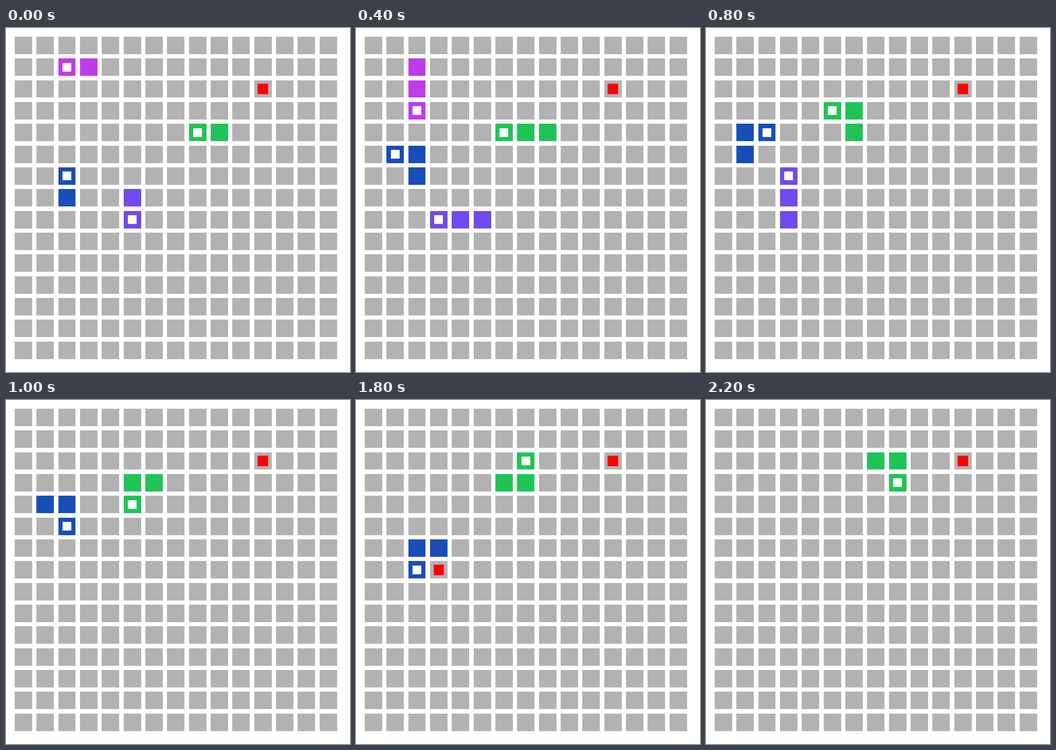
Recreate the animation shown at these times as an HTML page with a canvas. Size 748 px wide and 748 px high, loop 2.4 s.

```html
<!DOCTYPE html>
<html>
<head>
<meta charset="utf-8">
<style>
html, body { margin: 0; width: 100%; height: 100%; overflow: hidden; background: #fff; }
canvas { display: block; }
</style>
</head>
<body>
<canvas id="stage" width="748" height="748"></canvas>
<script>
const ctx = document.getElementById('stage').getContext('2d');
const SIZE = 748, CELLS = 15, PITCH = SIZE / (CELLS + 0.8);
const STEP = 200, STEPS = 12, LENGTH = 3;
const DIRS = { L: [-1, 0], R: [1, 0], U: [0, -1], D: [0, 1] };

// A snake lives for as many steps as it has moves.
const snakes = [
  { color: '#c03ce8', start: [3, 1], moves: 'LDDD' },
  { color: '#20c456', start: [9, 4], moves: 'LLLULDRURURD' },
  { color: '#184eb8', start: [2, 7], moves: 'UULURDRDLDR' },
  { color: '#704aec', start: [5, 7], moves: 'DLLUU' }
];
const foods = [
  { cell: [11, 2], from: 0, to: STEPS },
  { cell: [3, 7], from: 7, to: 10 }
];

for (const s of snakes) {
  s.path = [s.start];
  for (const m of s.moves) {
    const [x, y] = s.path[s.path.length - 1];
    s.path.push([x + DIRS[m][0], y + DIRS[m][1]]);
  }
}

// Square inset within its cell, snapped to whole pixels.
function square([col, row], color, inset = 0) {
  const near = i => Math.round((i + 0.4 + inset) * PITCH);
  const far = i => Math.round((i + 1.2 - inset) * PITCH);
  ctx.fillStyle = color;
  ctx.fillRect(near(col), near(row), far(col) - near(col), far(row) - near(row));
}

function draw(step) {
  ctx.fillStyle = '#fff';
  ctx.fillRect(0, 0, SIZE, SIZE);
  for (let i = 0; i < CELLS * CELLS; i++) {
    square([i % CELLS, Math.floor(i / CELLS)], '#b2b2b2');
  }
  for (const f of foods) {
    if (step >= f.from && step < f.to) square(f.cell, '#f00', 0.16);
  }
  for (const { color, path, moves } of snakes) {
    if (step >= moves.length) continue;
    const head = step + 1;
    for (let i = 0; i < LENGTH; i++) square(path[Math.max(0, head - i)], color);
    square(path[head], '#fff', 0.2);
  }
}

function frame() {
  draw(Math.floor(performance.now() / STEP) % STEPS);
  requestAnimationFrame(frame);
}
frame();
</script>
</body>
</html>
```
